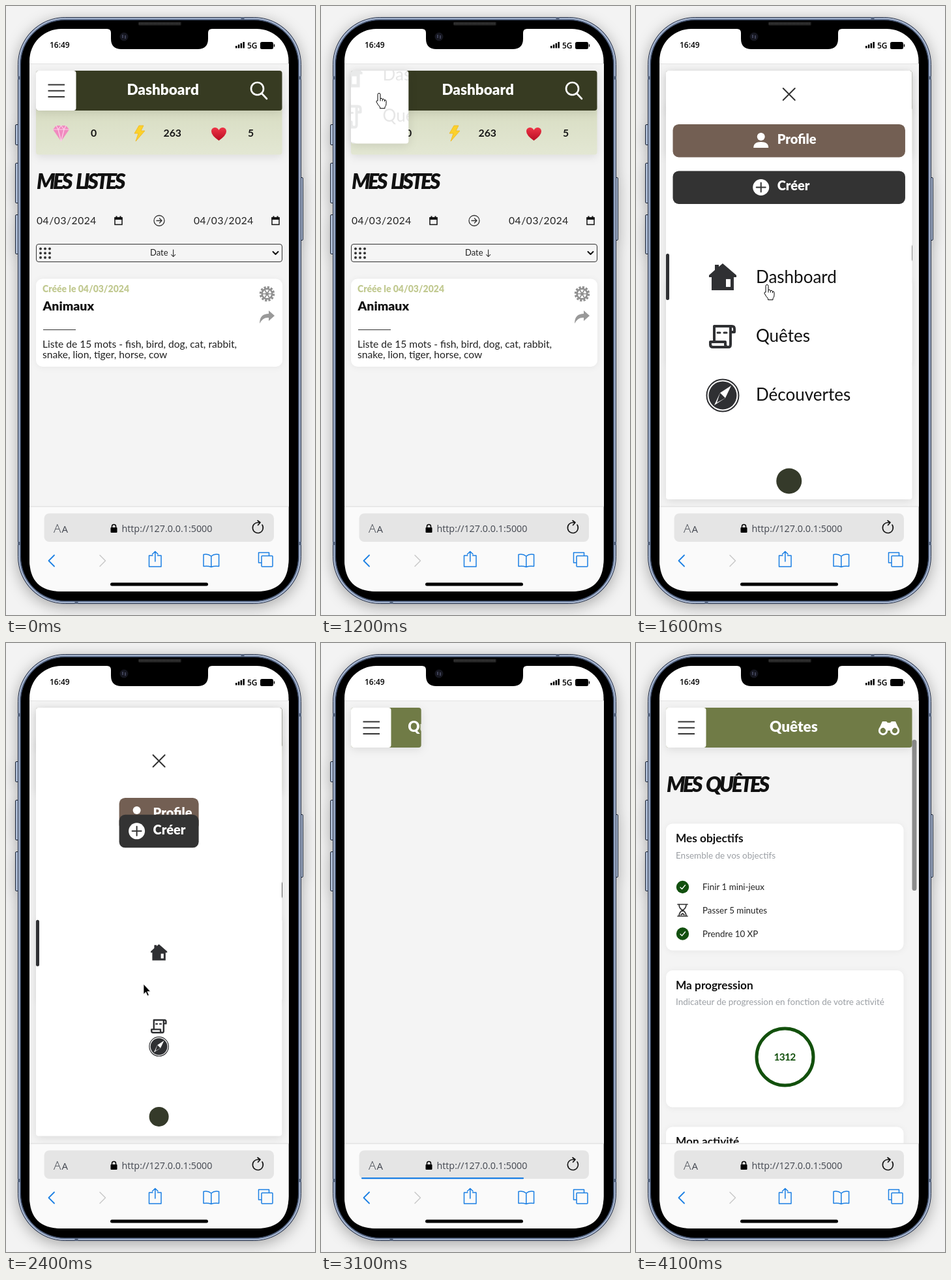
These frames come from a looping animation (474 px wide and 932 px high, 4.3 s). An HTML page:

```html
<!DOCTYPE html>
<html lang="fr">
<head>
<meta charset="utf-8">
<title>Dashboard</title>
<style>
html, body { margin: 0; height: 100%; overflow: hidden; background: #f3f3f3; }
svg { display: block; width: 474px; height: 932px; font-family: Lato, sans-serif; }
.b { font-weight: 700; }
.x { font-weight: 900; }
.h { font: italic 900 32px Lato, sans-serif; letter-spacing: -3.5px; word-spacing: 5px; fill: #111; }
.ui { font-family: "Open Sans", sans-serif; }
.card { fill: #fff; filter: drop-shadow(0 1px 5px #0000000e); }
.lift { filter: drop-shadow(0 3px 7px #0000001a); }
.ln { fill: none; stroke-linecap: round; stroke-linejoin: round; }
.sub { font-size: 13.5px; fill: #9b9fa4; }
.row { font-size: 13.4px; fill: #222; }
.t { font-size: 17.3px; font-weight: 700; fill: #111; }
</style>
</head>
<body>
<svg viewBox="0 0 474 932">
<defs>
  <clipPath id="pageClip"><rect x="36" y="88" width="398" height="678"/></clipPath>
  <clipPath id="menuClip"><rect id="menuHole" x="46" y="99" rx="4"/></clipPath>
  <clipPath id="headClip"><rect id="headHole" x="46" y="99" height="61" rx="4"/></clipPath>
  <linearGradient id="stats" x2="0" y2="1"><stop stop-color="#d7dcc1"/><stop offset="1" stop-color="#e3e7d3"/></linearGradient>
  <linearGradient id="red" x2="0" y2="1"><stop stop-color="#ee3447"/><stop offset="1" stop-color="#b80d22"/></linearGradient>
  <g id="burger">
    <rect x="46" y="99" width="61.5" height="61" rx="4" fill="#fff"/>
    <path d="M64.5 120.5h25.5M64.5 129.7h25.5M64.5 139h25.5" stroke="#333" stroke-width="2"/>
  </g>
  <g id="cal"><path d="M1 2.500h11v10.500H1z" fill="none" stroke="#111" stroke-width="1.500"/><path d="M.500 2h12v3.500H.500zM2.500 0h2v3h-2zM8.500 0h2v3h-2z" fill="#111"/></g>
  <g id="check"><circle r="9.700" fill="#12500f"/><path class="ln" d="M-3.500 .500l2.500 2.500 5-6" stroke="#fff" stroke-width="1.300"/></g>
  <g id="house"><path d="M0-21L21-3v3h-4v20h-34V0h-4v-3L-12-11v-8h6v3z" fill="#2f3033"/><path d="M5 3h7v12H5z" fill="#fff"/></g>
  <g id="scroll" class="ln" stroke="#2f3033" stroke-width="4"><path d="M-13 8v-24h27q4 0 4 4v5h-6M-13 8h-6v4q0 4 4 4h24q3 0 3-4v-27M-13 8H4v4q0 4 4 4"/><path d="M-8-6h4M2-6h4" stroke-width="3"/></g>
  <g id="compass"><circle r="24.500" fill="#fff" stroke="#2f3033" stroke-width="2"/><circle r="21.500" fill="#2f3033"/><path d="M13-15L4 4-13 15-4-4z" fill="#fff"/><path d="M-4-4L4 4-9 11z" fill="#2f3033"/></g>
</defs>

<!-- phone body -->
<g style="filter:drop-shadow(0 5px 11px #00000050)">
  <g fill="#aebdd6" stroke="#1d2636">
    <rect x="14.500" y="181.500" width="6" height="31" rx="1.500"/><rect x="14.500" y="240.500" width="6" height="61" rx="1.500"/>
    <rect x="14.500" y="319.500" width="6" height="60" rx="1.500"/><rect x="449.500" y="262.500" width="6" height="96" rx="1.500"/>
  </g>
  <rect x="18.500" y="17.500" width="434" height="897" rx="72" fill="#6c7d9d" stroke="#263047"/>
</g>
<rect x="20" y="19" width="431" height="894" rx="71" fill="none" stroke="#b7c5dc" stroke-width="1.500"/>
<path d="M18 110h4M449 110h4M18 822.500h4M449 822.500h4M363 17v4M108 911v4" stroke="#56657f" stroke-width="5"/>
<rect x="22.500" y="21.500" width="426" height="889" rx="68" fill="#000" stroke="#39465d"/>
<rect x="203" y="24" width="66" height="6" rx="2" fill="#191919"/>
<path d="M204 27h64" stroke="#444" stroke-width="3" stroke-dasharray="1 1"/>
<rect x="36" y="35" width="397.500" height="861" rx="49" fill="#fff"/>

<g clip-path="url(#pageClip)">
  <rect x="36" y="88" width="398" height="678" fill="#f4f4f4"/>

  <g id="dash">
    <rect class="lift" x="46" y="150" width="377.500" height="77.500" rx="4" fill="url(#stats)"/>
    <rect class="lift" x="46" y="99" width="377.500" height="61" rx="4" fill="#373b22"/>
    <use href="#burger"/>
    <text class="x" x="185.500" y="136" font-size="22.500" fill="#fff">Dashboard</text>
    <g class="ln" stroke="#fff" stroke-width="2.600"><circle cx="385.500" cy="126.500" r="9.500"/><path d="M392.500 134l7.500 8"/></g>
    <path d="M72 189l5-6h15l5 6-12.500 18z" fill="#f08abf"/>
    <path class="ln" d="M72 189h25M77 183l3 6 4.500 18 4.500-18 3-6M80 189l4.500-6 4.500 6" stroke="#fbd3e8" stroke-width="1.200"/>
    <path d="M204 183h7l-4 8h6l-14 16 4-12h-6z" fill="#fbd12b" stroke="#f0b51f" stroke-width=".800"/>
    <path d="M326.500 206Q315 198 315 192c0-7 9-8 11.500-2 2.500-6 11.500-5 11.500 2q0 6-11.500 14z" fill="url(#red)"/>
    <g class="b" font-size="15.800" fill="#151515"><text x="130" y="199.500">0</text><text x="241.500" y="199.500">263</text><text x="371" y="199.500">5</text></g>
    <text class="h" x="47" y="280">MES LISTES</text>
    <g font-size="15.500" letter-spacing=".600" fill="#222"><text x="47" y="333.500">04/03/2024</text><text x="288" y="333.500">04/03/2024</text></g>
    <use href="#cal" x="166" y="321.500"/><use href="#cal" x="407" y="321.500"/>
    <g class="ln" stroke="#333" stroke-width="1.300"><circle cx="235" cy="328.500" r="8"/><path d="M231 328.500h8M235.500 325l3.500 3.500-3.500 3.500"/></g>
    <rect x="46.500" y="364.500" width="377" height="27" rx="3.500" fill="#f5f5f5" stroke="#333"/>
    <path class="ln" d="M53 371.500h15M53 378.200h15M53 385h15" stroke="#333" stroke-width="4" stroke-dasharray="0 7"/>
    <text x="221" y="382" font-size="13" fill="#222">Date ↓</text>
    <path class="ln" d="M409.500 376l4 4 4-4" stroke="#111" stroke-width="2"/>
    <rect class="card" x="46" y="417.500" width="378" height="134.500" rx="10"/>
    <text class="x" x="56" y="438" font-size="14" fill="#c2ca92">Créée le 04/03/2024</text>
    <text class="x" x="56.500" y="465.500" font-size="19.500" fill="#111">Animaux</text>
    <path d="M57 495.500h50" stroke="#333"/>
    <g font-size="15.600" fill="#222"><text x="56" y="523">Liste de 15 mots - fish, bird, dog, cat, rabbit,</text><text x="56" y="538.500">snake, lion, tiger, horse, cow</text></g>
    <g transform="translate(400.500 440.500)" fill="none" stroke="#8f8f8f"><circle r="10" stroke-width="3.500" stroke-dasharray="3.140 2.096"/><circle r="7.800" stroke-width="2.500"/><path d="M-7 0H7M-3.500-6l7 12M3.500-6l-7 12" stroke-width="1.600"/><circle r="2" fill="#8f8f8f"/></g>
    <path d="M403 466l9 8-9 8v-5q-9-1-14 9 0-15 14-15z" fill="#999"/>
  </g>

  <g id="quests">
    <g id="content">
      <text class="h" x="47" y="227.500">MES QUÊTES</text>
      <rect class="card" x="46" y="276.500" width="364.500" height="194" rx="10"/>
      <text class="t" x="61" y="305">Mes objectifs</text>
      <text class="sub" x="61" y="330">Ensemble de vos objectifs</text>
      <use href="#check" x="71.500" y="373.500"/><use href="#check" x="71.500" y="445"/>
      <path class="ln" d="M64 400h15M64 418h15M66 400q0 6 5.500 9-5.500 3-5.500 9M77 400q0 6-5.500 9 5.500 3 5.500 9M69 416l2.500-2 2.500 2" stroke="#333" stroke-width="1.700"/>
      <g class="row"><text x="102" y="378">Finir 1 mini-jeux</text><text x="102" y="413.500">Passer 5 minutes</text><text x="102" y="449.500">Prendre 10 XP</text></g>
      <rect class="card" x="46" y="501" width="364.500" height="209.500" rx="10"/>
      <text class="t" x="61" y="530">Ma progression</text>
      <text class="sub" x="61" y="554">Indicateur de progression en fonction de votre activité</text>
      <circle cx="228.500" cy="633.500" r="43.500" fill="none" stroke="#12500c" stroke-width="5"/>
      <text class="b" x="228" y="639" text-anchor="middle" font-size="15.500" letter-spacing="-.700" fill="#12500c">1312</text>
      <rect class="card" x="46" y="740.500" width="364.500" height="209" rx="10"/>
      <text class="t" x="61" y="769">Mon activité</text>
    </g>
    <rect id="scrollbar" x="423.500" y="148" width="7" height="231" rx="3.500" fill="#8c8c8c"/>
    <rect id="head" class="lift" x="46" y="99" height="61" rx="4" fill="#707b46"/>
    <g clip-path="url(#headClip)">
      <text id="headText" class="x" y="136" font-size="22.500" fill="#fff">Quêtes</text>
      <g id="bino" fill="none" stroke="#fff" stroke-width="3"><circle cx="-9" cy="4" r="5.700"/><circle cx="9" cy="4" r="5.700"/><path d="M-15 1l5-11h6l2 2h4l2-2h6l5 11-6-3-5 6h-8l-5-6z" fill="#fff" stroke="none"/></g>
    </g>
    <use href="#burger"/>
  </g>

  <g id="menu">
    <rect id="panel" class="lift" x="46" y="99" rx="4" fill="#fff"/>
    <g clip-path="url(#menuClip)">
      <g id="top">
        <path id="close" class="ln" d="M-9-9L9 9M9-9L-9 9" stroke="#333" stroke-width="2"/>
        <g id="btn0"><rect height="50.500" rx="9" fill="#735f53"/><g fill="#fff"><circle cy="-6" r="6"/><path d="M-11.500 11q0-9 11.500-9t11.500 9z"/></g><text class="x" y="30" font-size="20" fill="#fff">Profile</text></g>
        <g id="btn1"><rect height="50.500" rx="9" fill="#333"/><g><circle r="12.500" fill="#fff"/><path class="ln" d="M-7 0H7M0-7V7" stroke="#333" stroke-width="2"/></g><text class="x" y="30" font-size="20" fill="#fff">Créer</text></g>
        <rect id="mark" x="46" width="5" height="71" rx="2.500" fill="#2f3033"/>
        <circle id="badge" r="19.500" fill="#353a2a"/>
      </g>
      <g id="items" font-size="26" fill="#111">
        <use id="icon0" href="#house"/><use id="icon1" href="#scroll"/><use id="icon2" href="#compass"/>
        <text id="label0">Dashboard</text><text id="label1">Quêtes</text><text id="label2">Découvertes</text>
      </g>
    </g>
  </g>
</g>

<!-- status bar -->
<path d="M36 88.500h398" stroke="#e3e3e3"/>
<path d="M155 35q6 0 6 6v9q0 16 16 16h117q16 0 16-16v-9q0-6 6-6z"/>
<circle cx="181" cy="47" r="6.500" fill="#15161f"/><path d="M179 44v5M183 45v5" stroke="#4b4f68" stroke-width="1.500"/>
<g class="ui" font-size="12" font-weight="600"><text x="67" y="64">16:49</text><text x="370" y="64.500">5G</text></g>
<path d="M352 61h2.500v3.500H352zM355.800 59h2.500v5.500h-2.500zM359.600 57h2.500v7.500h-2.500zM363.400 55h2.500v9.500h-2.500z"/>
<rect x="390" y="55" width="20" height="11" rx="2.500"/><path d="M411.500 58.500v4" stroke="#000" stroke-width="1.500"/>

<!-- browser bar -->
<path d="M36 766h397.500v81q0 49-49 49H85q-49 0-49-49z" fill="#fafafa"/>
<path d="M36 766h398" stroke="#dadada"/>
<rect x="58.500" y="776.500" width="352.500" height="43.500" rx="8" fill="#e5e5e5"/>
<g class="ui" fill="#42464f"><text x="73" y="806" font-size="19" font-weight="300">A</text><text x="85.500" y="806" font-size="15">A</text><text x="177.500" y="805" font-size="14.300">http://127.0.0.1:5000</text></g>
<rect x="160.500" y="798" width="10" height="8" rx="1"/><path d="M162.500 799v-2.500q0-3 3-3t3 3v2.500" fill="none" stroke="#000" stroke-width="1.500"/>
<path class="ln" d="M393 794a8 8 0 1 1-6-3.500h2M386 787.500l4 3-3.500 4" stroke="#111" stroke-width="1.600"/>
<rect id="load" x="62" y="818" height="2.200" rx="1" fill="#1b7fe3"/>
<g class="ln" stroke="#1b7fe3" stroke-width="1.500">
  <path d="M74 840.500l-8.500 8.500 8.500 8.500" stroke-width="1.800"/><path d="M144 840.500l8.500 8.500-8.500 8.500" stroke="#c9c9c9"/>
  <path d="M225 841h-5.500v17h18.500v-17h-5.500M228.800 850v-15M224.500 839l4.300-4.300 4.300 4.300"/>
  <path d="M314.800 842q-5-4-11.800-2.500v18q7-1 11.800 1 5-2 11.800-1v-18q-7-1.500-11.800 2.500zv16"/>
  <path d="M391.500 852h-4v-15.500h16v4.500"/><rect x="392" y="841.500" width="17" height="16.500" rx="1"/>
</g>
<rect x="160" y="882.500" width="150" height="5" rx="2.500"/>

<path id="hand" d="M5 .500q2 0 2 2v6q3-.800 3.300 1 2.700-.600 3.200 1.200 2.500-.200 2.500 2v4q0 3-2 5v2H6.500v-2q-3-3-5.500-8 0-2.500 2-1.700v-9.500q0-2 2-2zM7 8.500v4M10.300 9.500v3M13.500 10.700v2.500" fill="#fff" stroke="#000"/>
<path id="arrow" d="M0 0v15.500l3.500-3.300 2.500 5.800 2.300-1-2.500-5.700h4.700z" stroke="#fff" stroke-width=".700"/>
</svg>
<script>
const LOOP = 4300, OPEN = 1158, CLOSE = 2399, LOAD = 3000;
const $ = id => document.getElementById(id);
const set = (el, attrs) => { for (const k in attrs) el.setAttribute(k, attrs[k]); };
const move = (el, x, y, s = 1) => set(el, { transform: `translate(${x} ${y}) scale(${s})` });
const show = (el, on) => { el.style.display = on ? '' : 'none'; };
const mix = (a, b, k) => a + (b - a) * k;
const unit = v => Math.min(1, Math.max(0, v));

// CSS "ease" curve: cubic-bezier(.25, .1, .25, 1)
function ease(p) {
  p = unit(p);
  let lo = 0, hi = 1;
  for (let i = 0; i < 24; i++) {
    const u = (lo + hi) / 2, v = 1 - u;
    if (.75 * u * v + u * u * u < p) lo = u; else hi = u;
  }
  return .3 * lo * (1 - lo) ** 2 + 3 * lo * lo * (1 - lo) + lo ** 3;
}

// Linear track through [time, ...values]
function track(t, keys) {
  const i = keys.findIndex(k => k[0] > t);
  if (i === 0) return keys[0].slice(1);
  if (i < 0) return keys[keys.length - 1].slice(1);
  const a = keys[i - 1], b = keys[i], k = (t - a[0]) / (b[0] - a[0]);
  return a.slice(1).map((v, j) => mix(v, b[j + 1], k));
}

const POINTER = [[600, 446, 188], [700, 300, 172], [800, 89, 133], [1220, 89, 133], [1550, 201, 426], [1620, 201, 426], [1800, 211, 522]];
const LOADED = [[LOAD, 62], [3100, 311], [3600, 397], [3700, 411]];

function drawButton(el, cx, y, w, icon, label) {
  const [rect, glyph, text] = el.children;
  set(rect, { x: cx - w / 2, width: w });
  move(glyph, cx + icon, 25);
  set(text, { x: cx + label });
  move(el, 0, y);
}

function drawMenu(t) {
  const closing = t >= CLOSE;
  const f = closing ? 1 - ease((t - CLOSE) / 450) : ease((t - OPEN) / 450);
  show($('menu'), f > .001);
  const w = mix(61.5, 377.5, f), h = mix(61, 656, f), cx = 46 + w / 2;
  const at = y => 99 + (y - 99) * h / 656;
  set($('panel'), { width: w, height: h });
  set($('menuHole'), { width: w, height: h });
  set($('top'), { opacity: unit((f - .2) / .7) });
  set($('items'), { opacity: unit(f * 1.2) });

  move($('close'), cx, at(closing ? 180.5 : 135));
  const bw = closing ? Math.min(122, w - 4) : w - 21;
  const [icon, label] = closing ? [-34, -9] : [-43, -18];
  drawButton($('btn0'), cx, at(closing ? 237 : 181), bw, icon, label);
  drawButton($('btn1'), cx, at(closing ? 263 : 252.5), bw, icon, label);
  set($('mark'), { y: at(closing ? 424 : 379) });
  move($('badge'), cx, at(closing ? 725.5 : 727), closing ? .77 : 1);

  const k = (f - .089) / .911;
  [474, 587, 618].forEach((y, i) => {
    const openY = mix(106 + 64 * i, 415 + 90 * i, k);
    if (closing) move($('icon' + i), cx, at(y), .6);
    else move($('icon' + i), mix(43, 133, k), openY + (i > 0));
    show($('label' + i), !closing);
    move($('label' + i), mix(95, 184, k), openY + 9);
  });
}

function drawQuests(t) {
  const k = ease((t - 3035) / 500), w = mix(61.5, 377.5, k);
  set($('head'), { width: w });
  set($('headHole'), { width: w });
  move($('headText'), mix(121, 205, k), 0);
  move($('bino'), mix(253, 388, k), 130);
  const rise = ease((t - 3255) / 500);
  move($('content'), 0, 100 * (1 - rise));
  set($('content'), { opacity: rise });
  show($('scrollbar'), t >= 3255);
}

function drawPointer(t) {
  const [x, y] = track(t, POINTER), on = t >= 600 && t < 2900;
  const hand = t >= 790 && t < CLOSE;
  show($('hand'), on && hand);
  show($('arrow'), on && !hand);
  move($('hand'), x - 5, y);
  move($('arrow'), x, y);
}

function draw(now) {
  const t = now % LOOP;
  show($('dash'), t < LOAD);
  show($('quests'), t >= LOAD);
  drawMenu(t);
  drawQuests(t);
  drawPointer(t);
  show($('load'), t >= LOAD && t < 3700);
  set($('load'), { width: track(t, LOADED)[0] - 62 });
}

let start;
function tick(now) {
  start ??= now;
  draw(now - start);
  requestAnimationFrame(tick);
}
draw(0);
requestAnimationFrame(tick);
</script>
</body>
</html>
```
